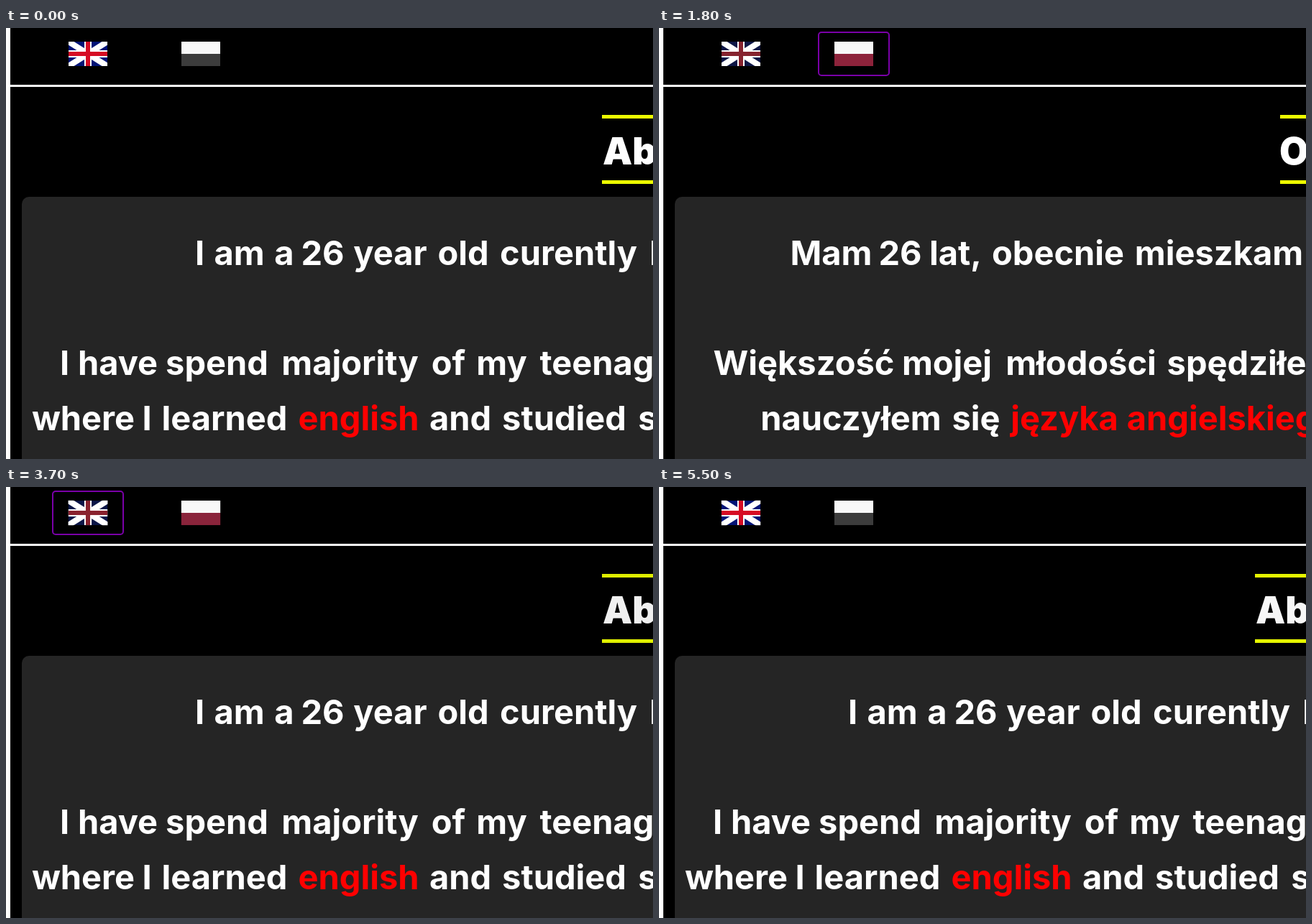
Recreate the animation shown at these times as an HTML page with a canvas. Size 900 by 600 pixels, loop 5600 ms.

```html
<!DOCTYPE html>
<html lang="en">
<head>
<meta charset="utf-8">
<title>Language switch</title>
<style>
  html, body { margin: 0; width: 100%; height: 100%; overflow: hidden; background: #000; }
  canvas { display: block; width: 900px; height: 600px; }
</style>
</head>
<body>
<canvas id="stage" width="900" height="600"></canvas>
<script>
const ctx = document.getElementById('stage').getContext('2d');
const LOOP = 5600, STEP = 100;
const PULSE = 911, PULSE_SHIFT = 16;
const TO_POLISH = 1800, TO_ENGLISH = 3700;
const BODY = '650 47px Inter, "Open Sans", sans-serif';
const HEAD = '900 52px Inter, "Open Sans", sans-serif';
const WHITE = [255, 255, 255], RED = [214, 12, 36], BLUE = [2, 20, 118];
const SNOW = [248, 248, 248], CRIMSON = [220, 12, 58];

// Each line: baseline, then words with their centres.
const pages = {
  en: {
    title: 'About', titleX: 831, ruleX: 829,
    lines: [
      [330, ['I', 269.5], ['am', 324.5], ['a', 387], ['26', 440.5], ['year', 534.5], ['old', 636], ['curently', 782.5], ['living', 958]],
      [483, ['I', 81.5], ['have', 155.5], ['spend', 293.5], ['majority', 478.5], ['of', 615.5], ['my', 689.5], ['teenage', 836]],
      [560, ['where', 107.5], ['I', 196], ['learned', 304], ['english', 490.5, 'red'], ['and', 632], ['studied', 776.5], ['software', 981]]
    ]
  },
  pl: {
    title: 'O mnie', titleX: 864, ruleX: 864,
    lines: [
      [330, ['Mam', 239.5], ['26', 335.5], ['lat,', 412.5], ['obecnie', 555], ['mieszkam', 779]],
      [483, ['Większość', 201.5], ['mojej', 400.5], ['młodości', 587], ['spędziłem', 825]],
      [560, ['nauczyłem', 267], ['się', 441], ['języka', 564], ['angielskiego', 797]]
    ]
  }
};
for (const w of pages.pl.lines[2].slice(3)) w.push('red');

const clamp = v => Math.max(0, Math.min(1, v));

function tint([r, g, b], colour) {
  const grey = 0.2126 * r + 0.7152 * g + 0.0722 * b;
  return `rgb(${[r, g, b].map(c => Math.round(grey + (c - grey) * colour)).join(',')})`;
}

function rect(x, y, w, h, fill) {
  ctx.fillStyle = fill;
  ctx.fillRect(x, y, w, h);
}

function flag(cx, scale, paint) {
  ctx.save();
  ctx.translate(cx, 36);
  ctx.scale(scale, scale);
  ctx.beginPath();
  ctx.rect(-27, -17, 54, 34);
  ctx.clip();
  paint();
  ctx.restore();
}

function unionFlag(colour) {
  rect(-27, -17, 54, 34, tint(BLUE, colour));
  ctx.strokeStyle = tint(WHITE, colour);
  ctx.lineWidth = 8;
  ctx.beginPath();
  ctx.moveTo(-29, -18.3); ctx.lineTo(29, 18.3);
  ctx.moveTo(29, -18.3); ctx.lineTo(-29, 18.3);
  ctx.stroke();
  rect(-27, -5, 54, 10, tint(WHITE, colour));
  rect(-5, -17, 10, 34, tint(WHITE, colour));
  rect(-27, -3, 54, 6, tint(RED, colour));
  rect(-3, -17, 6, 34, tint(RED, colour));
}

function polishFlag(colour) {
  rect(-27, -17, 54, 17, tint(SNOW, colour));
  rect(-27, 0, 54, 17, tint(CRIMSON, colour));
}

function hoverBox(x) {
  ctx.strokeStyle = '#7a00a8';
  ctx.lineWidth = 2;
  ctx.beginPath();
  ctx.roundRect(x + 1, 6, 98, 60, 4);
  ctx.stroke();
}

// Share of a colour change done, fast at first; half done on its first step.
const change = (t, start) => 1 - Math.pow(1 - clamp((t - start + 100) / 300), 1.75);

function draw(t) {
  const pulse = (1 - Math.cos(2 * Math.PI * (t + PULSE_SHIFT) / PULSE)) / 2;
  const polish = change(t, TO_POLISH) - change(t, TO_ENGLISH);
  const page = t >= TO_POLISH && t < TO_ENGLISH ? pages.pl : pages.en;

  rect(0, 0, 900, 600, '#000');
  rect(0, 0, 6, 600, '#fff');
  rect(0, 79, 900, 3, '#fff');

  const scale = 1 + 0.25 * pulse;
  flag(114, scale, () => unionFlag(1 - polish));
  flag(271, scale, () => polishFlag(polish));
  if (t >= 1100 && t < 2800) hoverBox(221);
  if (t >= 3000 && t < 4000) hoverBox(64);

  ctx.globalAlpha = 1 - pulse;
  rect(page.ruleX, 121, 900, 5, '#eeff00');
  rect(page.ruleX, 212, 900, 5, '#eeff00');
  ctx.font = HEAD;
  ctx.textAlign = 'left';
  ctx.fillStyle = '#fff';
  const bearing = ctx.measureText(page.title).actualBoundingBoxLeft;
  ctx.fillText(page.title, page.titleX + bearing, 190);
  ctx.globalAlpha = 1;

  ctx.fillStyle = '#252525';
  ctx.beginPath();
  ctx.roundRect(22, 235, 1000, 500, 10);
  ctx.fill();

  ctx.font = BODY;
  ctx.textAlign = 'center';
  for (const [y, ...words] of page.lines) {
    for (const [text, x, fill = '#fff'] of words) {
      ctx.fillStyle = fill;
      ctx.fillText(text, x, y);
    }
  }
}

const begin = performance.now();
function tick() {
  const t = (performance.now() - begin) % LOOP;
  draw(Math.floor(t / STEP) * STEP);
  requestAnimationFrame(tick);
}
tick();
</script>
</body>
</html>
```
